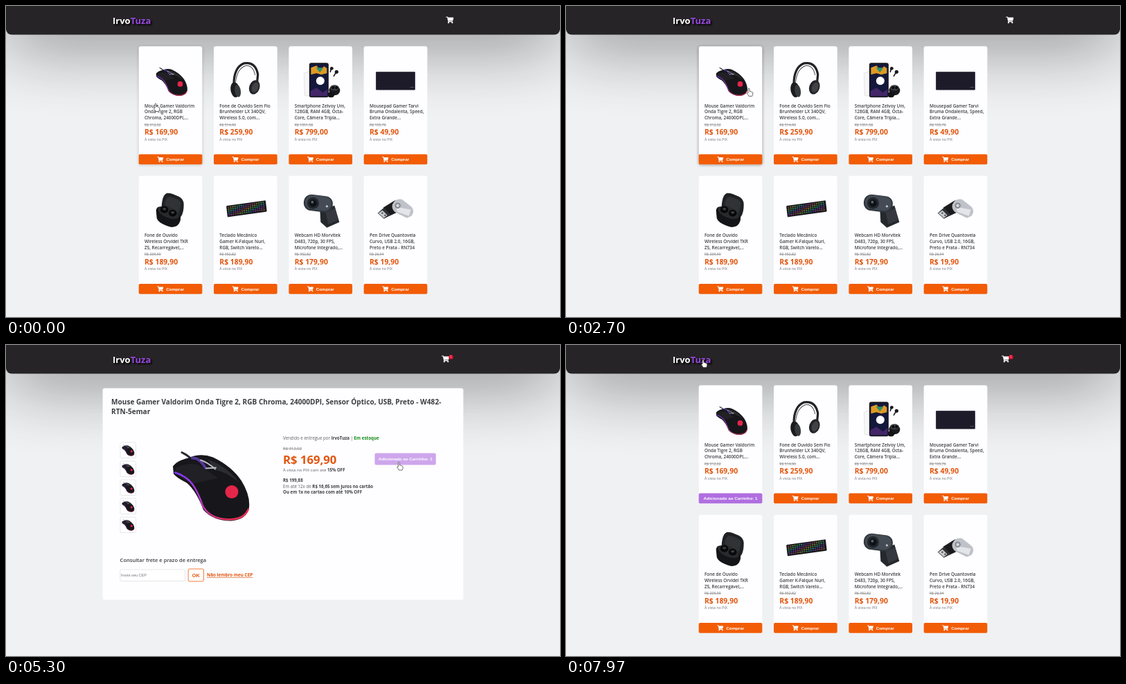
An HTML page for the animation above (8 s loop, 800 px wide and 450 px high).

```html
<!DOCTYPE html>
<html lang="pt-BR">
<head>
<meta charset="utf-8">
<title>Loja</title>
<style>
  html, body { margin: 0; width: 100%; height: 100%; overflow: hidden; background: #eff1f3; }
  svg { display: block; width: 100vw; height: 100vh; }
  text { font-family: "Open Sans", "Noto Sans", sans-serif; fill: #3c3f43; white-space: pre; }
  .arial { font-family: "Liberation Sans", Arial, sans-serif; }
  .name { font-size: 6.35px; font-weight: 600; }
  .old { fill: #777; text-decoration: line-through; }
  .price { fill: #e2560e; font-weight: 700; }
  .note { fill: #707378; }
  .info { font-size: 6.2px; fill: #5c6066; }
  .b { font-weight: 700; fill: #3c3f43; }
  .label { font-size: 6.24px; font-weight: 700; fill: #fff; }
  .logo { font-size: 13px; font-weight: 700; fill: #fff; filter: drop-shadow(2px 2px 1px #000); }
</style>
</head>
<body>
<svg id="stage" viewBox="0 0 800 450"></svg>
<script>
const LOOP = 8000, ORANGE = '#f25c05', PURPLE = '#b06ee0';
const SHOP_A = 'Irvo', SHOP_B = 'Tuza';
const OPEN_DETAIL = 3330, ADD_TO_CART = 5240, BACK_TO_LIST = 6670;
const CARD = { w: 91.7, h: 170.9, x0: 191.7, y0: 58.3, dx: 108.33, dy: 187.5 };

const products = [
  ['mouse', '312,02', '169,90', 'Mouse Gamer Valdorim', 'Onda Tigre 2, RGB', 'Chroma, 24000DPI,...'],
  ['headset', '514,90', '259,90', 'Fone de Ouvido Sem Fio', 'Brunhelder LX 340QV,', 'Wireless 5.0, com...'],
  ['phone', '1051,58', '799,00', 'Smartphone Zelvoy Um,', '128GB, RAM 4GB, Octa-', 'Core, Câmera Tripla...'],
  ['pad', '105,76', '49,90', 'Mousepad Gamer Tarvi', 'Bruma Ondalenta, Speed,', 'Extra Grande...'],
  ['buds', '209,90', '189,90', 'Fone de Ouvido', 'Wireless Orvidel TKR', 'Z5, Recarregável,...'],
  ['keyboard', '352,82', '189,90', 'Teclado Mecânico', 'Gamer K-Falque Nuri,', 'RGB, Switch Varelo...'],
  ['webcam', '352,82', '179,90', 'Webcam HD Morvitek', 'D483, 720p, 30 FPS,', 'Microfone Integrado,...'],
  ['drive', '26,94', '19,90', 'Pen Drive Quantovela', 'Curvo, USB 2.0, 16GB,', 'Preto e Prata - RN734']
];

const text = (x, y, s, cls = '', size = '') =>
  `<text x="${x}" y="${y}" class="${cls}"${size && ` style="font-size:${size}px"`}>${s}</text>`;
const rect = (x, y, w, h, fill, r = 0, more = '') =>
  `<rect x="${x}" y="${y}" width="${w}" height="${h}" rx="${r}" fill="${fill}" ${more}/>`;
const disc = (x, y, r, fill, ry = r, more = '') =>
  `<ellipse cx="${x}" cy="${y}" rx="${r}" ry="${ry}" fill="${fill}" ${more}/>`;
const path = (d, fill, more = '') => `<path d="${d}" fill="${fill}" ${more}/>`;
const line = (d, color, w) => path(d, 'none', `stroke="${color}" stroke-width="${w}" stroke-linecap="round"`);
const group = (attrs, body) => `<g ${attrs}>${body}</g>`;

const cart = (x, y, scale) => group(`transform="translate(${x} ${y}) scale(${scale})" fill="#fff"`,
  `<path d="M.6 0H4Q4.6 0 4.8 .7L5 2H17.3Q18.1 2 17.9 2.9L16.5 9.4Q16.3 10 15.7 10H6.6L6.8 11H15.3Q16 11 15.8 11.8L15.6 13H5.2L3 2H.6Q0 2 0 1.4V.6Q0 0 .6 0Z"/>
   <circle cx="6" cy="14.3" r="1.75"/><circle cx="15" cy="14.3" r="1.75"/>`);

// Drawn in a box of 110 by 102
const mouse = () =>
  line('M28 13Q22 6 13 2', '#29282e', 3) +
  path('M0 22Q6 14 22 10Q40 2 58 9Q85 22 99 43Q112 64 110 82Q107 99 84 101Q58 101 44 85Q34 58 20 46Q6 39 1 33Z', '#17171b') +
  path('M4 24Q24 15 39 21L65 39Q43 44 28 47Q10 38 4 32Z', '#202025') +
  path('M50 12Q78 22 95 45Q79 31 61 27Z', '#2c2c33') +
  line('M28 10Q38 9 47 24', '#56389b', 4) +
  line('M40 13Q50 16 61 26M48 25L62 24', '#b9bac2', 2) +
  line('M3 31Q22 37 31 52Q39 66 43 79Q53 98 80 99Q103 99 109 84', 'url(#led)', 2.4) +
  disc(85, 59, 9.5, '#e5264a');

const art = {
  mouse: () => group('transform="translate(25 30.4) scale(.41)"', mouse()),
  headset: () => group('transform="rotate(9 45 50)"',
    line('M30 58Q26 33 40 25Q56 20 62 38L63 54', '#222326', 3.2) +
    line('M32 54Q31 34 43 28Q53 26 58 39', '#4a4c50', 1) +
    disc(33, 65, 6.5, '#1b1c1f', 11, 'transform="rotate(-18 33 65)"') +
    disc(37, 66, 4.3, '#37393d', 9, 'transform="rotate(-18 37 66)"') +
    disc(60, 57, 7.5, '#232427', 10.5, 'transform="rotate(10 60 57)"') +
    disc(61, 57, 4.6, '#404247', 7.5, 'transform="rotate(10 61 57)"')),
  phone: () =>
    path('M22 39L33 35V73L23 71Z', '#f7f7f9', 'stroke="#ccc" stroke-width=".5"') +
    rect(29.5, 24, 28, 50, '#17181f', 3) +
    rect(31, 26, 25, 46, '#14183c', 2) +
    path('M32 31L40 28 45 34 51 29 55 32V39L47 41 40 39 32 41Z', '#df9a25') +
    path('M39 31H50L45 38Z', '#2f8f69') +
    path('M31 65L40 60 49 67 56 62V72H31Z', '#432667') +
    disc(45.5, 50, 6, '#fff') +
    line('M61 33L60 37M68 38L65 43', '#18191d', 1.6) +
    disc(62, 32, 2.4, '#18191d') + disc(69, 37, 2.6, '#18191d') +
    disc(66, 64, 8, '#191a1f', 7) + disc(66, 60, 6.4, '#3a3b42', 4) +
    disc(64, 60, 2, '#08090b') + disc(69, 60, 2, '#08090b') + disc(61, 70, 5, '#121317', 4),
  pad: () => rect(17.5, 37, 56.6, 26.2, '#191724', 1) +
    rect(17.5, 37, 56.6, 26.2, 'url(#weave)', 1) + rect(67, 59, 5, .6, '#77738a'),
  buds: () =>
    path('M33 44Q34 27 41 25Q46 24 58 30Q65 34 65 41Q65 55 60 60L36 48Z', '#202124') +
    path('M37 42Q39 31 44 30Q59 33 61 40L58 54Z', '#303236') +
    path('M25 50Q26 43 36 45L56 54Q62 58 60 65Q57 75 46 74Q28 69 26 61Z', '#141518') +
    disc(43, 53, 16, '#292a2e', 7.5, 'transform="rotate(22 43 53)"') +
    disc(37, 49, 5.8, '#08090a', 5) + disc(49, 54, 5.8, '#08090a', 5) +
    disc(37, 48, 2.6, '#3d3f43', 1.8) + disc(49, 53, 2.6, '#3d3f43', 1.8),
  keyboard: () => {
    let keys = '';
    for (let row = 0; row < 5; row++)
      for (let col = 0; col < 17; col++)
        keys += rect(2 + col * 3.2, 2 + row * 3.1, 2, 1.6, `hsl(${(col * 31 + row * 67) % 360} 45% 42%)`, .4);
    return group('transform="matrix(.98 -.14 .1 .87 18 43.5)"', rect(0, 0, 58, 18.7, '#18191e', 1.4) + keys);
  },
  webcam: () =>
    path('M45 50L66 43 73 67 55 75 46 67Z', '#25282d') +
    path('M53 53L67 47 71 64 57 70Z', '#363a40') +
    group('transform="rotate(7 42 40)"', rect(21.5, 28, 42, 23.5, '#30363d', 11) +
      rect(23.5, 29, 38, 20.5, '#444b54', 10)) +
    disc(35, 39.5, 8.5, '#22272d') + disc(35, 39.5, 5.2, '#0d1115') +
    disc(34, 38, 2, '#56606b') + disc(55, 44, 1.6, '#c1c7ce'),
  drive: () =>
    path('M28 46L44 36Q51 33 52 41L50 52 37 58Z', '#1b1b1e') +
    path('M20 54L29 46 39 57 29 62Z', '#303136') +
    path('M21 54L27 50 34 57 29 61Z', '#c9ccd1') +
    path('M25 54L27 52.5 28.5 54 26.5 55.5ZM29 57L31 55.5 32.5 57 30.5 58.5Z', '#55575d') +
    path('M41 42Q45 32 55 34L69 45Q74 50 69 58L62 61 46 53Q40 49 41 42Z', '#bfc2c8') +
    path('M47 45L68 49 65 58 48 52Z', '#e3e5e8') +
    disc(49, 43, 4.2, '#85888f') + disc(49, 43, 2.2, '#d7d9dc')
};

function button(id, x, y, w, h) {
  const mid = x + w / 2, base = y + h / 2 + 2.2;
  const added = `<text x="${mid}" y="${base}" text-anchor="middle" class="arial label">Adicionado ao Carrinho: 1</text>`;
  return group(`id="${id}"`,
    group('class="buy"', rect(x, y, w, h, ORANGE, 2) +
      group('class="caption"', cart(mid - 19.3, y + h / 2 - 4, .5) + text(mid - 6.4, base, 'Comprar', 'arial label'))) +
    group('class="added"', rect(x, y, w, h, PURPLE, 2) + added));
}

function card([kind, old, price, ...lines], i) {
  const x = CARD.x0 + i % 4 * CARD.dx, y = CARD.y0 + Math.floor(i / 4) * CARD.dy;
  return rect(x, y + .6, CARD.w, CARD.h, '#000', 3, `id="shade${i}" filter="url(#soft)" opacity="0"`) +
    rect(x, y, CARD.w, CARD.h, '#fefdff', 3) +
    group(`transform="translate(${x} ${y})"`, art[kind]() +
      lines.map((s, n) => text(8.3, 88.4 + n * 8.75, s, 'name')).join('') +
      text(8.3, 115.5, 'R$ ' + old, 'old', 5.2) +
      text(8.3, 128, 'R$ ' + price, 'price', 10.4) +
      text(8.3, 136.5, 'À vista no PIX', 'note', 5.3)) +
    button('buy' + i, x, y + 156.3, CARD.w, 14.6);
}

const bold = s => `<tspan class="b">${s}</tspan>`;

function detail() {
  let thumbs = '';
  for (let i = 0; i < 5; i++) {
    const y = 141 + i * 27;
    thumbs += rect(165, y, 22.5, 22.5, '#fff', 1.5, 'stroke="#dddde0" stroke-width=".7"') +
      group(`transform="translate(167.5 ${y + 3.3}) scale(.162)"`, mouse());
  }
  return rect(139.6, 62.5, 520.8, 306.2, '#fefdff', 3) +
    text(152, 86.4, 'Mouse Gamer Valdorim Onda Tigre 2, RGB Chroma, 24000DPI, Sensor Óptico, USB, Preto - W482-', 'b', 10.1) +
    text(152, 100.2, 'RTN-5emar', 'b', 10.1) + thumbs +
    group('transform="translate(241 153.5)"', mouse()) +
    text(400, 137, `Vendido e entregue por ${bold(SHOP_A + SHOP_B)} | <tspan class="b" style="fill:#148a14">Em estoque</tspan>`, 'info') +
    text(400, 152, 'R$ 312,02', 'old', 5.95) +
    text(400, 171.7, 'R$ 169,90', 'price', 16.7) +
    text(400, 182.6, `À vista no PIX com até ${bold('15% OFF')}`, 'info', 6.1) +
    text(400, 198, 'R$ 199,88', 'info b') +
    text(400, 206.8, `Em até 12x de ${bold('R$ 16,65 sem juros no cartão')}`, 'info') +
    text(400, 215.4, 'Ou em 1x no cartao com até 10% OFF', 'info b') +
    button('buyDetail', 532.5, 156.6, 88.3, 16.8) +
    text(164.6, 314, 'Consultar frete e prazo de entrega', 'name', 7.55) +
    rect(164.8, 325, 93.8, 16.5, '#fff', 1.5, 'stroke="#dddde0" stroke-width=".7"') +
    text(166, 335.2, 'Insira seu CEP', 'arial note', 5.55) +
    rect(263.2, 324, 22.3, 18, '#fff', 2, `stroke="${ORANGE}" stroke-width=".8"`) +
    text(268.8, 335.6, 'OK', 'arial price', 7.3) +
    `<text x="290" y="335.3" class="price" style="font-size:6.35px;text-decoration:underline">Não lembro meu CEP</text>`;
}

const stage = document.getElementById('stage');
stage.innerHTML = `<defs>
    <filter id="glow" filterUnits="userSpaceOnUse" x="-200" y="-200" width="1200" height="500"><feGaussianBlur stdDeviation="52"/></filter>
    <filter id="soft" x="-.2" y="-.2" width="1.4" height="1.4"><feGaussianBlur stdDeviation="2.2"/></filter>
    <linearGradient id="led" gradientUnits="userSpaceOnUse" x1="0" y1="30" x2="80" y2="100">
      <stop offset="0" stop-color="#7a35ff"/><stop offset=".5" stop-color="#b93ad8"/><stop offset="1" stop-color="#ee2f56"/>
    </linearGradient>
    <pattern id="weave" width="4" height="4" patternUnits="userSpaceOnUse">
      <path d="M0 4L4 0M0 0L4 4" stroke="#2b253d" stroke-width=".5"/>
    </pattern>
  </defs>` +
  rect(0, 0, 800, 450, '#eff1f3') +
  rect(0, 0, 800, 41.6, '#000', 0, 'filter="url(#glow)" opacity=".8"') +
  rect(0, -10, 800, 51.6, '#262427', 8.3) +
  text(154, 26.4, `${SHOP_A}<tspan fill="#9747e0">${SHOP_B}</tspan>`, 'logo') +
  group('id="cart"', cart(635.3, 15.4, .61)) +
  group('id="badge"', disc(642.6, 17.4, 3.2, '#e0102f') +
    '<text x="642.6" y="19" text-anchor="middle" style="font-size:4.4px;fill:#fff">1</text>') +
  group('id="list"', products.map(card).join('')) +
  group('id="detail"', detail()) +
  group('id="pointer" stroke="#333" stroke-width=".7" stroke-linejoin="round"',
    path('M0 0V8.2L1.9 6.5 3.2 9.4 4.5 8.8 3.2 6H5.6Z', '#fff', 'id="arrow"') +
    path('M-1 .8Q0-.6 1 .8V4.5Q2.4 4 3 5Q4.2 4.8 4.6 5.6Q5.8 5.5 5.8 7V9Q5 10.5 4.8 11.5H0Q-.8 9.6-2.6 7.6Q-2.6 6-1 6.8Z', '#fff', 'id="hand"'));

const el = id => document.getElementById(id);
const show = (node, on) => node.setAttribute('display', on ? 'inline' : 'none');
const clamp = v => Math.max(0, Math.min(1, v));
const inside = (x, y, l, t, w, h) => x >= l && x <= l + w && y >= t && y <= t + h;

// Rises at `on`, falls at `off`, each taking `span` ms
const hover = (t, on, off, span = 250) => clamp((t - on) / span) - clamp((t - off) / span);

const route = [
  [0, 216, 141], [350, 224, 158], [820, 247, 217], [1000, 249, 220], [1350, 335, 221],
  [1690, 348, 219], [1790, 348, 191], [2150, 338, 132], [2700, 264, 119], [3200, 261, 117],
  [3600, 261, 117], [4330, 556, 162], [4520, 568, 170], [4700, 569, 170], [5270, 569, 170],
  [5970, 279, 89], [6030, 246, 60], [6330, 198, 21]
];

function pointerAt(t) {
  const i = route.findIndex(p => p[0] > t);
  if (i < 0) return route[route.length - 1].slice(1);
  const [t0, x0, y0] = route[i - 1], [t1, x1, y1] = route[i];
  const u = (t - t0) / (t1 - t0), k = u * u * (3 - 2 * u);
  return [x0 + (x1 - x0) * k, y0 + (y1 - y0) * k];
}

function onLink(x, y, isDetail) {
  if (inside(x, y, 153, 12, 57, 20)) return true;
  if (isDetail) return inside(x, y, 532.5, 156.6, 88.3, 16.8);
  return products.some((_, i) => inside(x, y, CARD.x0 + i % 4 * CARD.dx,
    CARD.y0 + Math.floor(i / 4) * CARD.dy, CARD.w, CARD.h));
}

function setButton(id, fade, added) {
  const node = el(id);
  node.setAttribute('opacity', 1 - fade * .45);
  node.querySelector('.caption').setAttribute('opacity', 1 - fade * fade * .65);
  show(node.querySelector('.buy'), !added);
  show(node.querySelector('.added'), added);
}

function render(t) {
  const isDetail = t >= OPEN_DETAIL && t < BACK_TO_LIST, added = t >= ADD_TO_CART;
  show(el('list'), !isDetail);
  show(el('detail'), isDetail);
  show(el('badge'), added);
  el('cart').setAttribute('transform', `translate(${added ? -6.2 : 0} 0)`);

  el('shade0').setAttribute('opacity', .42 * (hover(t, -120, 1150) + hover(t, 2430, OPEN_DETAIL, 200)));
  el('shade1').setAttribute('opacity', .42 * hover(t, 1220, 2400));
  products.forEach((_, i) => setButton('buy' + i,
    i === 0 ? hover(t, 740, 1120) : i === 1 ? hover(t, 1240, 1770) : 0, added && i === 0));
  setButton('buyDetail', hover(t, 4390, 5270), added);

  const [x, y] = pointerAt(t), link = onLink(x, y, isDetail);
  el('pointer').setAttribute('transform', `translate(${x} ${y})`);
  show(el('hand'), link);
  show(el('arrow'), !link);
}

const start = performance.now();
function tick() {
  render((performance.now() - start) % LOOP);
  requestAnimationFrame(tick);
}
tick();
</script>
</body>
</html>
```
